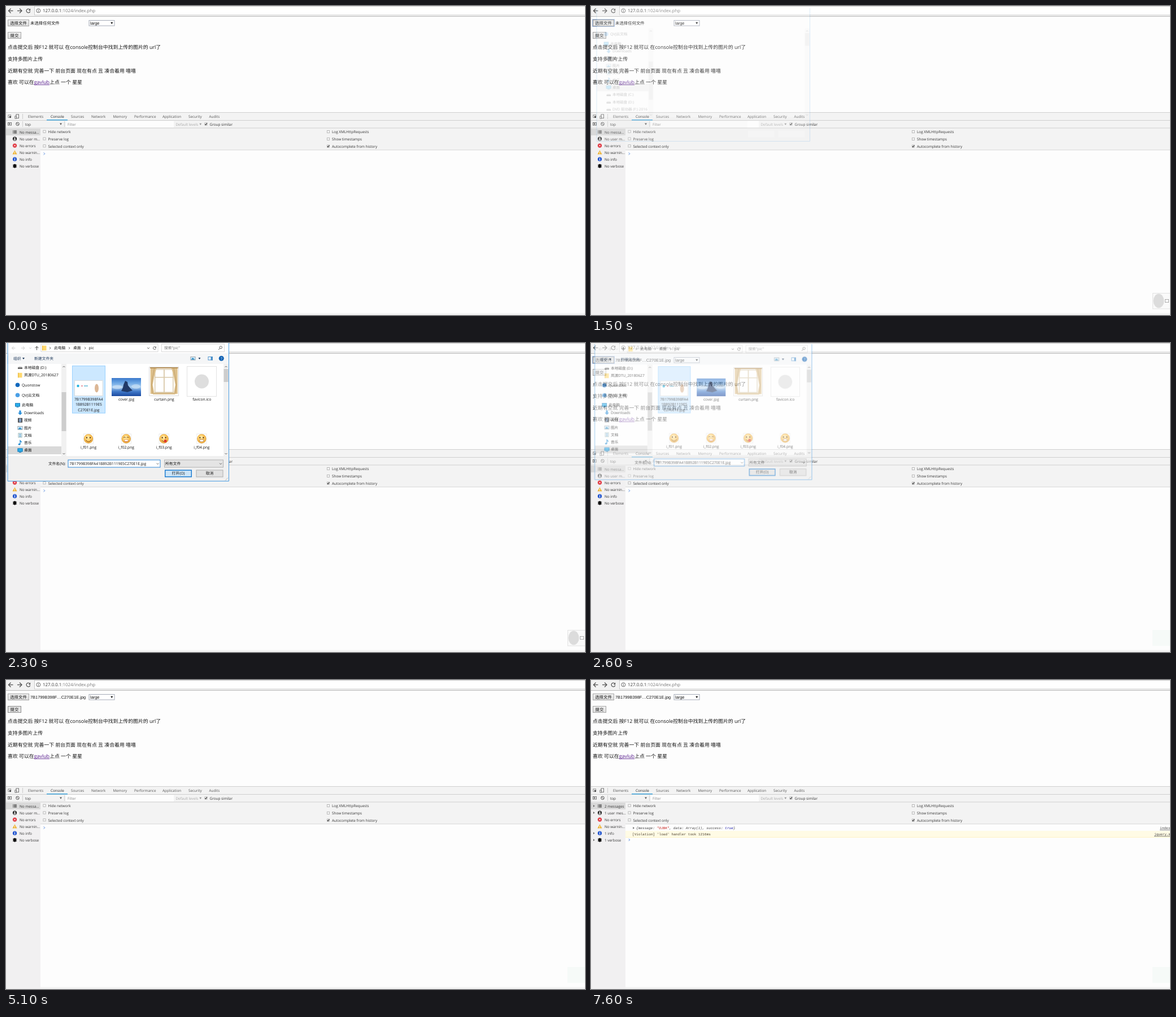
Recreate the animation shown at these times as an HTML page with a canvas. Size 1025 by 547 pixels, loop 8 s.

```html
<!DOCTYPE html>
<html lang="zh-CN">
<head>
<meta charset="utf-8">
<style>
html, body { margin: 0; width: 100%; height: 100%; overflow: hidden; background: #fdfdfd; }
canvas { display: block; }
</style>
</head>
<body>
<canvas id="stage" width="1025" height="547"></canvas>
<script>
const W = 1025, H = 547, LOOP = 8000, STEP = 100;
const UI = '"Open Sans", "Noto Sans CJK SC", "Noto Sans CJK", sans-serif';
const ARIAL = '"Liberation Sans", "Noto Sans CJK SC", sans-serif';
const MONO = '"Liberation Mono", monospace';
const screen = document.getElementById('stage').getContext('2d');
const layer = document.createElement('canvas');
layer.width = W;
layer.height = H;
const overlay = layer.getContext('2d');
let c = screen;

// ---- drawing helpers ----
function text(s, x, y, size = 6.4, color = '#333', font = UI, style = '') {
  c.font = `${style} ${size}px ${font}`;
  c.fillStyle = color;
  c.fillText(s, x, y + size * 0.36);
  return x + c.measureText(s).width;
}
function centered(s, x, y, size, color) {
  c.textAlign = 'center';
  text(s, x, y, size, color);
  c.textAlign = 'left';
}
function rect(x, y, w, h, fill) {
  c.fillStyle = fill;
  c.fillRect(x, y, w, h);
}
function box(x, y, w, h, fill, stroke, line = 1) {
  rect(x, y, w, h, fill);
  c.strokeStyle = stroke;
  c.lineWidth = line;
  c.strokeRect(x + line / 2, y + line / 2, w - line, h - line);
}
function disc(x, y, rx, fill, ry = rx) {
  c.beginPath();
  c.ellipse(x, y, rx, ry, 0, 0, 7);
  c.fillStyle = fill;
  c.fill();
}
function ring(x, y, r, color, line = 1, from = 0, to = Math.PI * 2) {
  c.beginPath();
  c.arc(x, y, r, from, to);
  c.strokeStyle = color;
  c.lineWidth = line;
  c.stroke();
}
function path(points, x, y) {
  c.beginPath();
  points.forEach(([dx, dy]) => c.lineTo(x + dx, y + dy));
}
function poly(points, x, y, fill) {
  path(points, x, y);
  c.fillStyle = fill;
  c.fill();
}
function line(points, x, y, color, width = 1) {
  path(points, x, y);
  c.strokeStyle = color;
  c.lineWidth = width;
  c.stroke();
}
function blend(y0, y1, ...colors) {
  const g = c.createLinearGradient(0, y0, 0, y1);
  colors.forEach((col, i) => g.addColorStop(i / (colors.length - 1), col));
  return g;
}
const down = (x, y, color, r = 2) => poly([[-r, -r * .7], [r, -r * .7], [0, r * .9]], x, y, color);
const right = (x, y, color) => poly([[-1.2, -2], [1.4, 0], [-1.2, 2]], x, y, color);
const chevron = (x, y, color, dir = 1) => line([[-2, -dir], [0, dir], [2, -dir]], x, y, color, .9);
const angle = (x, y, color) => line([[-1, -2], [1, 0], [-1, 2]], x, y, color, .9);

function arrow(x, y, dir, color, r = 4) {
  line([[-r * dir, 0], [r * dir, 0]], x, y, color, r / 3);
  line([[0, -r], [r * dir, 0], [0, r]], x, y, color, r / 3);
}
function reload(x, y, r, color) {
  ring(x, y, r, color, r / 2.8, .3, 5.5);
  poly([[r, -r - .5], [r, 0], [0, 0]], x + .3, y - .3, color);
}
function checkbox(x, y, on) {
  box(x - 2.5, y - 2.5, 5, 5, '#f8f8f8', '#aaa', .8);
  if (on) line([[-1.6, 0], [-.4, 1.4], [1.8, -1.6]], x, y, '#333', 1.1);
}
function button(x, y, w, h, label, state, focus) {
  const [top, bottom, edge] = {
    idle: ['#f3f3f3', '#dcdcdc', '#a6a6a6'],
    hover: ['#f8f8f8', '#e2e2e2', '#8c8c8c'],
    press: ['#dedede', '#e9e9e9', '#8c8c8c']
  }[state];
  if (focus) box(x - 1, y - 1, w + 2, h + 2, '#fff', '#a9c4ec');
  box(x, y, w, h, blend(y, y + h, top, bottom), edge);
  centered(label, x + w / 2, y + h / 2, 7.4, '#111');
}

// ---- browser page ----
function toolbar() {
  rect(0, 0, W, 18, '#f2f2f2');
  box(50, 0, W, 16.5, '#fff', '#c9c9c9');
  rect(0, 18, W, 1, '#b9b9b9');
  arrow(8.5, 8.5, -1, '#555');
  arrow(24, 8.5, 1, '#555');
  reload(39.5, 8.5, 3.4, '#555');
  ring(57.3, 8.3, 3.5, '#555', .9);
  rect(56.8, 7.8, 1, 2.6, '#555');
  rect(56.8, 6.2, 1, 1, '#555');
  const x = text('127.0.0.1', 65, 8.3, 7.9, '#333');
  text(':1024/index.php', x, 8.3, 7.9, '#777');
}

function page(s) {
  rect(0, 0, W, H, '#fdfdfd');
  toolbar();
  button(3, 24, 38, 12, '选择文件', s.pick, s.pickFocus);
  if (s.chosen) text('7B1799B398F…C270E1E.jpg', 43, 30, 7.4, '#111', ARIAL);
  else text('未选择任何文件', 43, 30, 7.4, '#111');
  box(146.5, 25, 46, 10.5, '#fff', '#a5abb8');
  text('large', 149, 30.3, 7.4, '#111', ARIAL);
  down(187.3, 30.2, '#111', 2.1);
  button(3, 46, 24, 12, '提交', s.send, false);
  const para = (t, x, y, col = '#111') => text(t, x, y, 8.9, col);
  para('点击提交后 按F12 就可以 在console控制台中找到上传的图片的 url了', 3, 73);
  para('支持多图片上传', 3, 94);
  para('近期有空就 完善一下 前台页面 现在有点 丑 凑合着用 嘻嘻', 3, 114.3);
  const a = para('喜欢 可以在', 3, 135);
  const b = para('gavlub', a, 135, '#551a8b');
  rect(a, 139, b - a, .8, '#551a8b');
  para('上点 一个 星星', b, 135);
}

// ---- developer tools ----
const TABS = [['Elements', 39], ['Console', 79], ['Sources', 115], ['Network', 151], ['Memory', 189.5],
  ['Performance', 227], ['Application', 277], ['Security', 323], ['Audits', 359.5]];
const QUIET = ['No messa…', 'No user m…', 'No errors', 'No warnin…', 'No info', 'No verbose'];
const COUNTS = [
  ['1 message', '1 user mes…', 'No errors', 'No warnin…', '1 info', 'No verbose'],
  ['2 messages', '1 user mes…', 'No errors', 'No warnin…', '1 info', '1 verbose']
];

function sideIcon(i, x, y) {
  if (i === 0) [-2, 0, 2].forEach(d => { rect(x - 3.5, y + d - .6, 1.2, 1.2, '#444'); rect(x - 1.6, y + d - .6, 5, 1.2, '#444'); });
  if (i === 1) {
    disc(x, y, 3.6, '#222');
    disc(x, y - 1, 1.2, '#fff');
    disc(x, y + 1.7, 2, '#fff', .9);
  }
  if (i === 2) {
    disc(x, y, 3.6, '#e0313c');
    line([[-1.4, -1.4], [1.4, 1.4]], x, y, '#fff');
    line([[1.4, -1.4], [-1.4, 1.4]], x, y, '#fff');
  }
  if (i === 3) {
    poly([[0, -3.7], [4, 3.3], [-4, 3.3]], x, y, '#edb02c');
    rect(x - .5, y - 1.2, 1, 2.4, '#fff');
    rect(x - .5, y + 1.8, 1, .9, '#fff');
  }
  if (i === 4) {
    disc(x, y, 3.6, '#2456cf');
    rect(x - .6, y - .6, 1.2, 2.8, '#fff');
    rect(x - .6, y - 2.3, 1.2, 1.1, '#fff');
  }
  if (i === 5) {
    disc(x, y, 2.6, '#111', 3.4);
    [-2, 0, 2].forEach(d => rect(x - 3.6, y + d - .4, 7.2, .8, '#111'));
  }
}

function devtools(logs) {
  rect(0, 188, W, H - 188, '#f3f3f3');
  [188, 202, 215.5].forEach(y => rect(0, y, W, 1, '#cfcfcf'));
  box(3.5, 192.5, 5.5, 5.5, '#f3f3f3', '#777', .8);
  poly([[0, 0], [4, 1.6], [1.6, 4]], 5.5, 194.5, '#333');
  box(17.5, 191.5, 5.5, 7.5, '#f3f3f3', '#666', .9);
  box(15.5, 194.5, 3.5, 5, '#f3f3f3', '#666', .9);
  rect(29, 191, 1, 9, '#ccc');
  TABS.forEach(([t, x], i) => text(t, x, 195.6, 6.35, i === 1 ? '#222' : '#555'));
  rect(72, 201, 37, 1.5, '#3ca3dc');

  box(3, 206, 7, 5.5, '#f3f3f3', '#666', .9);
  right(6.5, 208.8, '#555');
  ring(20.5, 208.8, 2.8, '#555');
  line([[-2, -2], [2, 2]], 20.5, 208.8, '#555');
  rect(29, 204, 1, 10, '#d0d0d0');
  text('top', 34, 209.3);
  down(97, 209, '#555');
  rect(103, 204, 1, 10, '#d0d0d0');
  rect(106, 203.5, 191, 11.5, '#fdfdfd');
  text('Filter', 109, 209.5, 6.35, '#888');
  text('Default levels', 300.5, 209.3, 6.35, '#aaa');
  down(344.3, 209.2, '#999');
  checkbox(354, 209, true);
  text('Group similar', 360.5, 209.3);

  const left = ['Hide network', 'Preserve log', 'Selected context only'];
  const rest = ['Log XMLHttpRequests', 'Show timestamps', 'Autocomplete from history'];
  [222.8, 235.6, 248.4].forEach((y, i) => {
    checkbox(68, y - .6, false);
    text(left[i], 74.5, y + .3);
    checkbox(570.5, y - .2, i === 2);
    text(rest[i], 577, y + .3);
  });
  rect(61, 254.5, W, 1, '#cfcfcf');
  rect(61, 255.5, W, 288, '#fdfdfd');

  rect(0, 216.5, 61, H, '#f1f0f1');
  rect(0, 217, 61, 12, '#d9d9d9');
  const names = logs ? COUNTS[logs - 1] : QUIET;
  names.forEach((t, i) => {
    const y = 223 + i * 12.05;
    sideIcon(i, 15.5, y);
    text(t, 24, y + .4);
    if (!t.startsWith('No')) right(5.2, y, '#666');
  });
  consoleRows(logs);
}

function link(s, x, y) {
  const end = text(s, x, y, 6.1, '#444', MONO);
  rect(x, y + 3, end - x, .7, '#555');
}

function consoleRows(logs) {
  if (logs > 0) {
    right(75.5, 262, '#666');
    let x = 80;
    [['{message: ', '#444'], ['"OJBK"', '#c41a16'], [', data: Array(1), success: ', '#444'],
      ['true', '#1c1caa'], ['}', '#444']].forEach(([t, col]) => { x = text(t, x, 262, 6.1, col, MONO, 'italic'); });
    link('index.php:19', 1007, 262);
    rect(61, 267, W, 1, '#f0f0f0');
  }
  if (logs > 1) {
    rect(61, 267, W, 11.5, '#fffbe5');
    rect(61, 278, W, 1, '#fff3c4');
    text("[Violation] 'load' handler took 1216ms", 73, 273, 6.1, '#4d4330', MONO);
    link('jquery.min.js:2', 997, 273);
  }
  angle(67.7, [261.5, 272.5, 283][logs], '#3a76d8');
}

// ---- file dialog ----
const NAV = [['本地磁盘 (D:)', 43.3, 'disk'], ['岚渡DTU_20180627', 56.8, 'folder'], ['Quonstow', 74.3, 'dot', '#0f68bd'],
  ['QVJ云文档', 92.2, 'dot', '#4a9fe6'], ['此电脑', 110, 'pc'], ['Downloads', 123.4, 'down'], ['视频', 136.8, 'film'],
  ['图片', 150.1, 'image'], ['文档', 163.4, 'doc'], ['音乐', 176.7, 'note'], ['桌面', 190, 'pc'],
  ['本地磁盘 (C:)', 203.5, 'disk'], ['本地磁盘 (D:)', 217, 'disk'], ['DVD 驱动器 (F:) 2016', 230.3, 'disk']];

function navIcon(kind, x, y, color) {
  const draw = {
    disk() { rect(x - 4, y, 8, 2.5, '#555'); rect(x - 3, y - 1.5, 6, 1.5, '#bbb'); },
    folder() { rect(x - 4, y - 4, 7.5, 8.5, '#ffd970'); rect(x - 4, y - 4, 1.2, 8.5, '#e9b93c'); },
    dot() { disc(x, y, 3.8, color); },
    pc() { box(x - 4.5, y - 3.5, 9, 6, '#27b0ef', '#1c79b5'); rect(x - 2, y + 3, 4, 1, '#1c79b5'); },
    down() { poly([[-1.6, -4], [1.6, -4], [1.6, 0], [4, 0], [0, 4.2], [-4, 0], [-1.6, 0]], x, y, '#2b8fd9'); },
    film() { rect(x - 4, y - 4, 8, 8, '#4a4a4a'); rect(x - 2.2, y - 3, 4.4, 6, '#7f9cc0'); },
    image() { box(x - 4.5, y - 3, 9, 6.5, '#cfeafc', '#999', .8); poly([[-3.5, 2.6], [-.5, -1], [3.5, 2.6]], x, y, '#2f8cc0'); },
    doc() { box(x - 3.5, y - 4, 7, 8, '#fff', '#8aa', .8); [-2, 0, 2].forEach(d => rect(x - 2, y + d - .4, 4, .9, '#3d8fc7')); },
    note() { disc(x - 1.5, y + 2.6, 1.8, '#1f8ad2', 1.5); line([[0, 2.6], [0, -4], [2.8, -1]], x, y, '#1f8ad2', 1.3); }
  };
  draw[kind]();
}

function scrollbar(x, y0, y1) {
  rect(x, 37, 9, 163, '#f1f1f1');
  rect(x + .5, y0, 8, y1 - y0, '#cdcdcd');
  chevron(x + 4.5, 42, '#555', -1);
  chevron(x + 4.5, 196, '#555');
}

function face(x, y, kind) {
  box(x - 9, y - 9, 18, 18, '#fff', '#e6e6e6', .8);
  const g = c.createRadialGradient(x - 1.5, y - 3, 1, x, y, 8.5);
  g.addColorStop(0, '#ffeaa8');
  g.addColorStop(.65, '#fcc65a');
  g.addColorStop(1, '#dd9a35');
  disc(x, y, 8.2, g);
  const eye = kind === 1 ? (d => ring(x + d, y - 1.5, 1.6, '#7a4a1a', .9, Math.PI, 0)) : (d => disc(x + d, y - 2, 1, '#5a3210', 1.5));
  eye(-3);
  eye(3);
  if (kind === 0) ring(x, y + .5, 4.8, '#8a4c14', 1, .3, 2.85);
  if (kind === 1) { disc(x, y + 3.5, 4, '#d06a30', 2.2); disc(x, y + 3.2, 3.3, '#fff', 1.4); }
  if (kind === 2) { ring(x, y + 1, 4, '#8a4c14', 1, .2, 2.9); disc(x + 2.5, y + 4, 2.4, '#df3b30', 2.8); }
  if (kind === 3) { disc(x, y + 3.2, 4, '#a5642a', 2.4); disc(x, y + 3.2, 3.4, '#fff', 1.8); }
}

function curtain() {
  box(253, 42, 53, 52, '#fefdfb', '#ddd');
  box(263, 46, 33.5, 42, '#fff', '#d9c9aa', 1.4);
  rect(279, 46, 1.8, 42, '#d9c9aa');
  rect(263, 60, 33.5, 1.5, '#d9c9aa');
  for (const d of [-1, 1]) {
    poly([[13 * d, 0], [24 * d, 0], [24 * d, 46], [17 * d, 46], [20 * d, 30], [17 * d, 14]], 279.7, 44, '#ddc08c');
    line([[17 * d, 0], [20 * d, 16], [22 * d, 30], [20 * d, 46]], 279.7, 44, '#c2a069');
  }
  rect(255, 43, 49.5, 2, '#b9935a');
  rect(260, 88, 39.5, 3, '#d8bd8c');
}

function thumbs() {
  box(121, 66, 50.5, 28, '#fff', '#dcdcdc');
  disc(127.5, 76, 2.2, '#27b4e0');
  rect(133, 75, 3, 2, '#e79aa5');
  rect(138, 75, 7, 2, '#8ccbe0');
  disc(160.5, 80, 3.5, '#dcb795', 7.5);

  rect(187, 62, 52, 32, blend(62, 94, '#3a78cb', '#6aa5e4', '#a5cbef', '#3f78c8', '#1c4a9f'));
  disc(197, 78, 9, '#d8eafa99', 3.5);
  disc(230, 77, 8, '#d8eafa88', 4);
  poly([[-1, -11], [3, -9], [4, -3], [8, 2], [12, 6], [3, 9], [-8, 7], [-5, 1], [-4, -4]], 212, 78, '#213a68');

  curtain();

  box(320, 41, 53, 54, '#fff', '#e3e3e3');
  disc(346.5, 68, 12.5, '#dedede');
}

function files(selected) {
  if (selected < 1) rect(184, 40, 59, 65.5, '#e0f0fc');
  if (selected === 1) rect(117, 40, 59, 84, '#e5f3ff');
  if (selected > 1) box(117, 40, 59, 84.5, '#cce8ff', '#99d1ff');
  thumbs();
  ['7B1799B398FA4', '1B892B1119E5', 'C270E1E.jpg'].forEach((t, i) => centered(t, 146.3, 99.7 + i * 9.3, 6.7, '#111'));
  [['cover.jpg', 213], ['curtain.png', 280], ['favicon.ico', 346.8]].forEach(([t, x]) => centered(t, x, 99.7, 6.7, '#111'));
  for (let i = 0; i < 4; i++) {
    const x = 146 + i * 66.8;
    face(x, 169.5, i);
    centered(`i_f0${i + 1}.png`, x, 184.7, 6.7, '#111');
  }
}

function dialogBars() {
  arrow(13.5, 9, -1, '#ccc', 3);
  arrow(30, 9, 1, '#ccc', 3);
  chevron(43, 9, '#ccc');
  line([[0, 3.5], [0, -3]], 54.5, 9, '#444');
  line([[-3, 0], [0, -3], [3, 0]], 54.5, 9, '#444');
  box(61.5, 1.5, 208, 14.5, '#fff', '#dadada');
  navIcon('folder', 68, 8.7);
  [78, 112, 140].forEach(x => angle(x, 9, '#555'));
  text('此电脑', 85, 9, 6.8, '#111');
  text('桌面', 119, 9, 6.8, '#111');
  text('pic', 146.5, 9, 6.8, '#111');
  chevron(252, 9, '#555');
  reload(263, 9, 2.5, '#555');
  box(275, 1.5, 112, 14.5, '#fff', '#dadada');
  text('搜索"pic"', 280, 9, 6.8, '#777');
  ring(380.3, 7.8, 2.2, '#555', .9);
  line([[0, 0], [-2.6, 2.6]], 378.8, 9.4, '#555');

  rect(3, 18, 391, 19, '#f5f6f7');
  text('组织', 13, 27.5, 6.8, '#1e395b');
  down(31, 27.3, '#1e395b');
  text('新建文件夹', 50, 27.5, 6.8, '#1e395b');
  navIcon('image', 331, 27);
  down(342.5, 27.3, '#1e395b');
  box(357.5, 24, 8.5, 6.5, '#fff', '#4a8fca');
  rect(362.5, 24, 3.5, 6.5, '#4a8fca');
  disc(381.3, 27.3, 4.5, '#0f62b4');
  centered('?', 381.3, 27.3, 6.5, '#fff');
}

function dialogForm(s) {
  text('文件名(N):', 75, 213.5, 6.7, '#111');
  box(109.5, 206.5, 164, 14, '#fff', '#2b83d3');
  if (s.selected > 1) text('7B1799B398FA41B892B1119E5C270E1E.jpg', 112.5, 213.5, 6.7, '#111');
  else rect(112, 209, 1, 9, '#222');
  chevron(268.5, 213.8, '#555');
  box(280, 206.5, 105, 14, '#e4e4e4', '#b4b4b4');
  text('所有文件', 282, 213.5, 6.8, '#111');
  chevron(380, 213.8, '#555');
  box(281, 224.5, 48, 13, s.confirm ? '#cce4f7' : '#e1e1e1', '#1678cf', 1.4);
  centered('打开(O)', 305, 231, 6.8, '#111');
  box(336.5, 224.5, 48, 13, '#e1e1e1', '#b2b2b2');
  centered('取消', 360.5, 231, 6.8, '#111');
  line([[-5, 0], [0, -5]], 393, 243.5, '#bbb');
}

// While opening, only the folder tree and the empty panels are painted.
function dialog(s) {
  rect(2.5, 0, 392, 245, '#fff');
  if (s.loaded) dialogBars();

  c.save();
  c.beginPath();
  c.rect(3, 37, 391, 161);
  c.clip();
  const shift = s.loaded ? 0 : -44.6;
  rect(3, 183 + shift, 95, 14, '#d9d9d9');
  NAV.forEach(([t, y, kind, color]) => {
    const root = kind === 'dot' || t === '此电脑';
    navIcon(kind, root ? 20.5 : 25, y + shift, color);
    text(t, root ? 28 : 32, y + shift, 6.75, '#111');
  });
  rect(98, 37, W, 163, '#fff');
  if (s.loaded) files(s.selected);
  c.restore();
  if (s.loaded) scrollbar(98, 87, 156);
  else scrollbar(98, 98, 168);
  scrollbar(385, 46, 69);

  rect(3, 200, 391, 45, '#f0f0f0');
  if (s.loaded) dialogForm(s);
  else {
    rect(280, 206.5, 105, 14, '#fff');
    rect(281, 224.5, 48, 13, '#fff');
    rect(336.5, 224.5, 48, 13, '#fff');
  }
  line([[0, 0], [0, 245], [391.5, 245], [391.5, 0]], 3, -.5, '#4a9de2');
}

function alertBox(s) {
  c.shadowColor = '#0008';
  c.shadowBlur = 4;
  c.shadowOffsetY = 1;
  rect(407.5, 16.5, 249.5, 70.5, '#fff');
  c.shadowColor = 'transparent';
  c.strokeStyle = '#b5b5b5';
  c.lineWidth = .8;
  c.strokeRect(407.5, 16.5, 249.5, 70.5);
  text('127.0.0.1:1024 显示', 417, 32.6, 8.4, '#333');
  text('true', 417, 48.3, 7.2, '#757575');
  box(611, 61, 38.5, 18, s.ok ? '#3367d6' : '#4285f4', '#a8c7fa');
  centered('确定', 630.2, 70.3, 6.9, '#fff');
}

function companion(visible) {
  if (!visible) return rect(994, 508, 31, 28, '#f6faf8');
  box(994, 508, 33, 28.5, '#fafafa', '#e2e2e2');
  disc(1005, 522, 9.5, '#dcdcdc', 12.5);
  box(1016, 519, 7, 6, '#fff', '#999', .8);
}

// Draws a window on its own layer, then fades it in around a pivot.
function fade(draw, s, alpha, scale, px, py, dy = 0) {
  if (!alpha) return;
  c = overlay;
  c.clearRect(0, 0, W, H);
  draw(s);
  c = screen;
  c.save();
  c.globalAlpha = alpha;
  c.translate(px, py + dy);
  c.scale(scale, scale);
  c.drawImage(layer, -px, -py);
  c.restore();
}

// ---- timeline, in steps of 100 ms ----
const within = (k, a, b) => k >= a && k < b;
const POSES = { 14: [.06, .95], 15: [.2, .964], 16: [.65, .988], 25: [.92, .994], 26: [.55, .982], 27: [.18, .965] };
const ALERT = { 63: [.3, -4], 64: [.75, -1.5], 73: [.55, 0], 74: [.15, 0] };

function render(t) {
  const k = Math.floor(t / STEP);
  const s = {
    pick: within(k, 9, 12) ? 'hover' : within(k, 12, 28) ? 'press' : 'idle',
    pickFocus: within(k, 12, 51),
    send: within(k, 51, 53) ? 'press' : within(k, 32, 37) || within(k, 53, 57) ? 'hover' : 'idle',
    chosen: k >= 25,
    loaded: k >= 17,
    selected: k < 19 ? 0 : k < 20 ? 1 : 2,
    confirm: within(k, 23, 25),
    ok: within(k, 72, 75),
    logs: k < 75 ? 0 : k < 76 ? 1 : 2
  };
  page(s);
  devtools(s.logs);
  if (k >= 13) companion(k < 25);
  const [alpha, scale] = POSES[k] || [within(k, 17, 25) ? 1 : 0, 1];
  fade(dialog, s, alpha, scale, 198.5, 106);
  const [shown, dy] = ALERT[k] || [within(k, 65, 73) ? 1 : 0, 0];
  fade(alertBox, s, shown, 1, 532, 50, dy);
}

for (const ctx of [screen, overlay]) ctx.textRendering = 'geometricPrecision';
const start = performance.now();
function tick() {
  render((performance.now() - start) % LOOP);
  requestAnimationFrame(tick);
}
tick();
</script>
</body>
</html>
```
